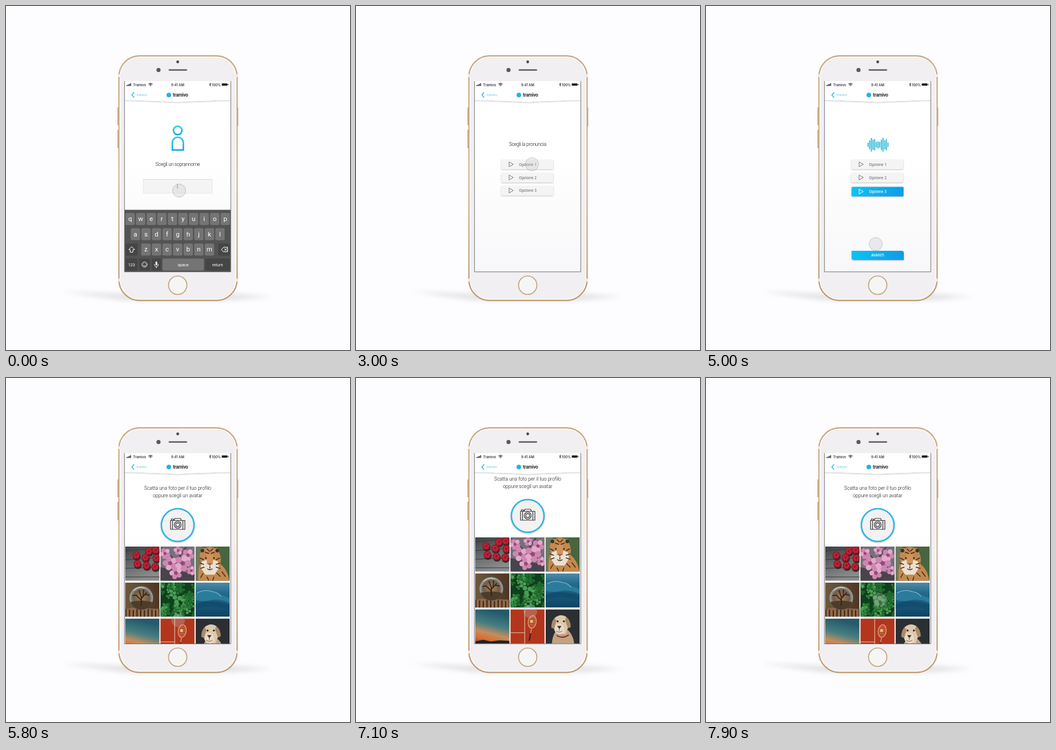
An HTML page for the animation above (8000 ms loop, 600 by 600 pixels).

```html
<!DOCTYPE html>
<html lang="it">
<head>
<meta charset="utf-8">
<title>Profile setup</title>
<style>
html, body { margin: 0; width: 100%; height: 100%; overflow: hidden; background: #fdfcfe; }
svg { display: block; width: 100vw; height: 100vh; }
text { text-anchor: middle; }
.title { font: 300 8.5px Roboto, sans-serif; letter-spacing: -.28px; fill: #111; }
.wide { letter-spacing: 0; }
.status { font: 500 5.9px Inter, sans-serif; fill: #222; }
.back { font: 300 5.7px Roboto, sans-serif; fill: #2bb9ea; }
.brand { font: 700 8.4px Roboto, sans-serif; letter-spacing: -.3px; fill: #333; }
.name { font: 9px "Open Sans", sans-serif; letter-spacing: .3px; fill: #777; }
.option { font: 600 6.4px "Open Sans", sans-serif; fill: #777; }
.next { font: 600 6.4px "Open Sans", sans-serif; fill: #fff; }
.key { font: 11.5px Roboto, sans-serif; fill: #fff; }
.small { font-size: 7.2px; }

/* every motion shares one 8 s cycle */
.anim, .part { animation: 8s linear infinite; }
.anim { animation-timing-function: ease-in-out; }
.part { opacity: 0; animation-name: flash; animation-timing-function: step-end; }
#pointer { animation-name: move; }
#pointer g { animation-name: blink; }
#nickname { animation-name: fade-a; }
#voice { animation-name: fade-b; }
#photo { animation-name: fade-c; }
#scroll { animation-name: scroll; }
#keyboard { animation-name: drop; }
#typed { animation-name: typed; }
#prompt { animation-name: prompt; }
.chosen { animation-name: chosen; }
.sel1 { animation-name: sel1; }
.sel2 { animation-name: sel2; }
.sel3 { animation-name: sel3; }
.bar { transform-box: fill-box; transform-origin: center; animation: bounce .5s ease-in-out infinite alternate; }
#typed, #prompt, .chosen, .sel { animation-timing-function: step-end; }

@keyframes move {
  0%, 11% { transform: translate(302px, 322px); }
  16.5%, 21% { transform: translate(305px, 426px); }
  35%, 39.5% { transform: translate(307px, 276px); }
  45%, 48.5% { transform: translate(307px, 299px); }
  53%, 57% { transform: translate(306px, 324px); animation-timing-function: ease-in; }
  62.5% { transform: translate(296px, 415px); animation-timing-function: ease-out; }
  65%, 69% { transform: translate(299px, 436px); animation-timing-function: ease-in-out; }
  77%, 82.5% { transform: translate(302px, 402px); }
  84% { transform: translate(303px, 423px); }
  88%, 91.25% { transform: translate(304px, 407px); }
  94% { transform: translate(304px, 423px); }
  97.5%, 100% { transform: translate(303px, 387px); }
}
@keyframes blink { 0%, 1.25%, 11%, 100% { opacity: 1; } 3.5%, 9% { opacity: 0; } }
@keyframes fade-a { 0%, 20% { opacity: 1; } 22%, 100% { opacity: 0; } }
@keyframes fade-b { 0%, 20%, 70.5%, 100% { opacity: 0; } 22%, 68.5% { opacity: 1; } }
@keyframes fade-c { 0%, 68.5% { opacity: 0; } 70.5%, 100% { opacity: 1; } }
@keyframes scroll { 0%, 84%, 94%, 100% { transform: none; } 88%, 91.25% { transform: translateY(-16px); } }
@keyframes drop { 0%, 8% { transform: none; } 11%, 100% { transform: translateY(110px); } }
@keyframes flash { 0% { opacity: 1; } 1.25%, 100% { opacity: 0; } }
@keyframes typed { 0% { opacity: 0; } 7.5%, 100% { opacity: 1; } }
@keyframes prompt { 0% { opacity: 1; } 38.75%, 100% { opacity: 0; } }
@keyframes chosen { 0% { opacity: 0; } 38.75%, 100% { opacity: 1; } }
@keyframes sel1 { 0%, 47.5%, 100% { opacity: 0; } 38.75% { opacity: 1; } }
@keyframes sel2 { 0%, 56.25%, 100% { opacity: 0; } 47.5% { opacity: 1; } }
@keyframes sel3 { 0% { opacity: 0; } 56.25%, 100% { opacity: 1; } }
@keyframes bounce { to { transform: scaleY(var(--s)); } }
</style>
</head>
<body>
<svg viewBox="0 0 600 600">
  <defs>
    <linearGradient id="blue"><stop stop-color="#0cc3f2"/><stop offset="1" stop-color="#0a9ce8"/></linearGradient>
    <linearGradient id="teal" x2="0" y2="1"><stop stop-color="#35cfe6"/><stop offset="1" stop-color="#1aa6e6"/></linearGradient>
    <linearGradient id="page" x2="0" y2="1"><stop offset=".4" stop-color="#fff"/><stop offset="1" stop-color="#f8f7f9"/></linearGradient>
    <linearGradient id="gold" x2="0" y2="1"><stop stop-color="#c9a87f"/><stop offset=".5" stop-color="#d3b797"/><stop offset="1" stop-color="#bd9a70"/></linearGradient>
    <linearGradient id="sea" x2="0" y2="1"><stop stop-color="#4f8ba6"/><stop offset=".3" stop-color="#246a8e"/><stop offset="1" stop-color="#0d4463"/></linearGradient>
    <linearGradient id="dusk" x1=".25" x2="0" y2="1"><stop stop-color="#245a6c"/><stop offset=".38" stop-color="#487f82"/><stop offset=".62" stop-color="#c58d5c"/><stop offset=".82" stop-color="#dc6a30"/><stop offset="1" stop-color="#8a3c22"/></linearGradient>
    <linearGradient id="wood" x2=".3" y2="1"><stop stop-color="#3d4244"/><stop offset=".55" stop-color="#666a6b"/><stop offset="1" stop-color="#8b8d8c"/></linearGradient>
    <linearGradient id="bark"><stop stop-color="#6d5a3b"/><stop offset="1" stop-color="#4d3524"/></linearGradient>
    <radialGradient id="glass"><stop stop-color="#a87f54"/><stop offset=".7" stop-color="#6f5c48"/><stop offset="1" stop-color="#9fabad"/></radialGradient>
    <filter id="soft" x="-20%" y="-40%" width="140%" height="200%"><feDropShadow dx="0" dy="1" stdDeviation="1" flood-opacity=".28"/></filter>
    <filter id="blur" x="-20%" y="-150%" width="140%" height="400%"><feGaussianBlur stdDeviation="4"/></filter>
    <clipPath id="screen"><path d="M207 131H392V463.500H207Z"/></clipPath>
    <clipPath id="tile"><path d="M0 0H59.500V59.500H0Z"/></clipPath>
    <g id="next" filter="url(#soft)">
      <path d="M254 421H341Q345 421 345 425V437H258Q254 437 254 433Z" fill="url(#blue)"/>
      <text class="next" x="299.500" y="431.200">AVANTI</text>
    </g>
  </defs>

  <!-- floor shadow -->
  <path d="M95 498L205 502H395L465 507L395 513H205Z" fill="#777" opacity=".2" filter="url(#blur)"/>

  <!-- phone body -->
  <path d="M194.500 177h3v31h-3zM194.500 216h3v32h-3zM402.500 177h2.500v32h-2.500z" fill="#c09b70"/>
  <rect x="197" y="87" width="206" height="426.500" rx="36" fill="#f1eff1" stroke="url(#gold)" stroke-width="2.400"/>
  <rect x="199" y="89" width="202" height="422.500" rx="34" fill="none" stroke="#fbfafb" stroke-width="1.500"/>
  <path d="M195 121.500h5M400 121.500h5M195 478h5M400 478h5" stroke="#f1edea" stroke-width="5"/>
  <circle cx="299.500" cy="97.500" r="2.400" fill="#4b4749"/>
  <circle cx="266" cy="111.700" r="3.600" fill="#5d5a5c"/>
  <rect x="283.500" y="110.300" width="32.500" height="2.600" rx="1.300" fill="#6b6566"/>
  <circle cx="299.500" cy="487" r="16" fill="#f6f5f6" stroke="#c4a27c" stroke-width="1.700"/>

  <g clip-path="url(#screen)">
    <path d="M207 131H392V464H207Z" fill="url(#page)"/>

    <g id="nickname" class="anim">
      <g fill="none" stroke="url(#teal)" stroke-width="2.700">
        <circle cx="299.500" cy="217" r="7.400"/>
        <path d="M290.100 251.200V238.500a9.600 9.600 0 0 1 19.200 0V251.200Z"/>
      </g>
      <text class="title" x="299.500" y="279">Scegli un soprannome</text>
      <path d="M239.500 302.500h120v24h-120z" fill="#f5f4f5" stroke="#e8e7e9"/>
      <path d="M239 302.500h121" stroke="#d9d8da"/>
      <path class="part" d="M299 310.500v8" stroke="#777" stroke-width=".9"/>
      <g id="letters"></g>
      <use href="#next"/>
      <g id="keyboard" class="anim"><path d="M206 355.500H393V464H206Z" fill="#535354"/></g>
    </g>

    <g id="voice" class="anim">
      <text id="prompt" class="title anim" x="299.300" y="243.500">Scegli la pronuncia</text>
      <g id="wave" class="anim chosen"></g>
      <g id="options"></g>
      <g class="anim chosen"><use href="#next" y="6"/></g>
    </g>

    <g id="photo" class="anim">
      <g id="scroll" class="anim">
        <text class="title wide" x="299.500" y="194.500">Scatta una foto per il tuo profilo</text>
        <text class="title wide" x="299.500" y="208.300">oppure scegli un avatar</text>
        <circle cx="299.500" cy="256.500" r="28.500" fill="#f3f2f3" stroke="#2bb4e6" stroke-width="2.600" filter="url(#soft)"/>
        <g fill="none" stroke="#333" stroke-width="1.200">
          <path d="M287 248.500h25v15.500h-25zM293 248.500l1.500-3.500h10l1.500 3.500M288.500 248v-2h3.500v2M290.500 249v15M308.500 249v15"/>
          <circle cx="299.500" cy="256" r="6" fill="#f3f2f3"/>
          <circle cx="299.500" cy="256" r="3.400"/>
        </g>
        <g id="tiles"></g>
      </g>
    </g>

    <!-- header -->
    <path d="M206 131H393V164Q349 165 299.500 167.500Q250 165 206 164Z" fill="#fff" filter="url(#soft)"/>
    <path d="M210 138h1.500v1.500H210zM212.200 137h1.500v2.500h-1.500zM214.400 136h1.500v3.500h-1.500zM216.600 134.800h1.500v4.700h-1.500z" fill="#222"/>
    <text class="status" x="233" y="139.500">Tramivo</text>
    <path d="M248.500 136.400q3.500-3 7 0M250.200 138q1.800-1.600 3.600 0" fill="none" stroke="#222" stroke-width="1.200"/>
    <circle cx="252" cy="139" r=".7" fill="#222"/>
    <text class="status" x="299.500" y="139.500">9:41 AM</text>
    <path d="M354.600 135.500l3 3-1.500 1.300v-5.600l1.500 1.300-3 3" fill="none" stroke="#222" stroke-width=".7"/>
    <text class="status" x="367" y="139.500">100%</text>
    <rect x="376.300" y="135" width="10" height="4" rx=".8" fill="#222"/>
    <path d="M387 136h1v2h-1z" fill="#222"/>
    <path d="M223.500 150.500l-4 4.700 4 4.700" fill="none" stroke="#22b5e8" stroke-width="1.400"/>
    <text class="back" x="237" y="157.300">Indietro</text>
    <circle cx="284" cy="155.300" r="4" fill="#1fb5e6"/>
    <text class="brand" x="304.300" y="158.300">tramivo</text>
  </g>
  <path d="M206.700 131V463.700H392V131" fill="none" stroke="#646265" stroke-width=".9"/>

  <g id="pointer" class="anim"><g class="anim">
    <circle r="11.500" fill="#c4c4c6" fill-opacity=".3" stroke="#8a8a8c" stroke-opacity=".5" stroke-width=".8"/>
  </g></g>
</svg>
<script>
const add = (id, html) => document.getElementById(id).insertAdjacentHTML("beforeend", html);
const each = (n, fn) => Array.from({ length: n }, (_, i) => fn(i)).join("");
const dot = (x, y, r, fill) => `<circle cx="${x}" cy="${y}" r="${r}" fill="${fill}"/>`;
const path = (d, fill, extra = "") => `<path d="${d}" fill="${fill}" ${extra}/>`;
const line = (d, color, width) => path(d, "none", `stroke="${color}" stroke-width="${width}" stroke-linecap="round"`);

// nickname typed letter by letter, centred
const nick = "Serena";
add("letters", each(nick.length - 1, i =>
  `<text class="name part" style="animation-delay:${(i + 1) / 10}s" x="299.500" y="317.300">${nick.slice(0, i + 1)}</text>`) +
  `<text id="typed" class="name anim" x="299.500" y="317.300">${nick}</text>`);

// keyboard
const key = (x, y, w, label, fill = "#747475", cls = "") =>
  `<rect x="${x}" y="${y}" width="${w}" height="21" rx="2.500" fill="${fill}"/>` +
  `<text class="key ${cls}" x="${x + w / 2}" y="${y + (cls ? 13 : 14.2)}">${label}</text>`;
const dark = "#454546";
["qwertyuiop", "asdfghjkl", "zxcvbnm"].forEach((row, r) =>
  add("keyboard", each(row.length, i => key([208.3, 217.5, 235.9][r] + i * 18.45, 361 + r * 26.6, 16.3, row[i]))));
add("keyboard",
  key(208.5, 414.2, 21, "", dark) + key(370, 414.2, 20.5, "", dark) +
  key(208.5, 440.5, 21, "123", dark, "small") + key(232, 440.5, 19.5, "", dark) +
  key(254, 440.5, 16.5, "", dark) + key(273, 440.5, 72, "space", "#747475", "small") +
  key(347.5, 440.5, 43, "return", dark, "small") +
  line("M219 420l-5 5h2.700v4.500h4.600V425h2.700zM376 424.700l3.500-4h7v8h-7zM381 422.700l4 4m0-4l-4 4", "#fff", 1) +
  line("M246.200 451a4.500 4.500 0 1 1-9 0a4.500 4.500 0 1 1 9 0M239 452q2.700 3.500 5.400 0M240 449.300v.2M243.500 449.300v.2", "#fff", .9) +
  line("M259 450.500q0 4 3.300 4t3.300-4M262.300 454.500v2.500", "#fff", 1) +
  line("M262.300 447v3.800", "#fff", 3));

// sound wave
const bars = [8, 16, 24, 18, 20, 10, 13, 10, 18, 24, 16, 20, 8];
add("wave", bars.map((h, i) =>
  `<rect class="bar" style="--s:${i % 2 ? .5 : h > 18 ? .6 : 1.4}" x="${281.7 + i * 2.9}" y="${242 - h / 2}" width="1.900" height="${h}" rx=".9" fill="#2fb9d8"/>`).join(""));

// pronunciation options
const option = (n, y, on) =>
  `<g ${on ? `class="anim sel sel${n}"` : ""}>
    <rect x="${on ? 254 : 253.5}" y="${y}" width="90.500" height="16.500" rx="1.500" fill="${on ? "url(#blue)" : "#f5f4f5"}" filter="url(#soft)"/>
    ${line(`M267 ${y + 4.2}v8.200l7-4.100z`, on ? "#fff" : "#777", 1)}
    <text class="option" x="299.500" y="${y + 10.6}" ${on ? 'style="fill:#fff"' : ""}>Opzione ${n}</text>
  </g>`;
[268, 291, 313.7].forEach((y, i) => add("options", option(i + 1, y) + option(i + 1, y + 1.8, true)));

// avatar pictures, each on a 59.5 square
const full = fill => path("M0 0H60V60H0Z", fill);
const flower = (x, y, r) => each(5, i => {
  const a = i * 1.257 + x;
  return dot(x + r * Math.cos(a), y + r * Math.sin(a), r * .62, i % 2 ? "#e3a8cb" : "#cf86b2");
}) + dot(x, y, r * .4, "#a04474");
const berry = (x, y) => dot(x + 1, y + 2.5, 6.8, "#2b2a2c") + dot(x, y, 6.6, "#9c1527") +
  each(6, i => dot(x + 3.6 * Math.cos(i), y + 3.6 * Math.sin(i), 1.7, "#bd2738"));
const clover = (x, y, r, fill) => each(3, i =>
  dot(x + r * Math.cos(i * 2.09 + x), y + r * Math.sin(i * 2.09 + x), r * .8, fill));
const greens = ["#1d6a2d", "#34883f", "#236f31", "#4f9f56"];

const pictures = [
  full("url(#wood)") + each(4, i => line(`M0 ${8 + i * 15}L60 ${2 + i * 17}`, "#333839", 1.2)) +
    [[41, 8], [53, 6], [19, 15], [54, 20], [35, 19], [21, 30], [37, 33], [52, 35]].map(p => berry(...p)).join(""),
  full("#75707a") + path("M0 36L60 48V60H0Z", "#4a434c") + line("M3 3L27 25L59 43M28 25L44 2", "#4d2e3b", 2) +
    [[8, 12, 6], [31, 7, 5], [48, 15, 7], [17, 29, 8], [39, 29, 9], [27, 46, 7], [54, 42, 5]].map(p => flower(...p)).join(""),
  full("#47663f") + path("M0 0H12V60H0Z", "#6c7a61") + path("M5 60Q4 40 9 26Q5 14 10 9Q9 1 16 3Q25 -2 34 3Q42 1 41 10Q46 20 43 30Q56 40 59 60Z", "#c4894f") +
    dot(12, 7, 3.2, "#403126") + dot(38, 7, 3.2, "#403126") + path("M11 26Q25 19 39 26L41 37L33 49H17L9 37Z", "#ebe0d0") +
    path("M19 15L25 11L31 15L30 31H20Z", "#d0935b") + path("M21 29h8l-4 5z", "#a0604f") + dot(18, 20, 1.5, "#2c241d") + dot(32, 20, 1.5, "#2c241d") +
    line("M20 4l4 4M30 4l-4 4M17 10l6 2M33 10l-6 2M8 20l6 3M42 20l-6 3M8 29l6 2M42 29l-6 2M9 38l6-2M43 38l-7-2M25 35v3M21 39q4 3 8 0M13 47l-4 7M37 46l6 6M46 44l6 8M20 53l3 6M32 53l-2 6", "#3a2d23", 1.5),
  full("url(#bark)") + path("M0 47L11 44L60 46V60H0Z", "#92694a") +
    each(10, i => line(`M${i * 6.5 + 1} ${47 + i % 3}v12`, "#33251b", 2)) + dot(28, 27, 20.5, "url(#glass)") +
    path("M9 34Q28 29 47 34Q43 47 28 47.500Q14 47 9 34Z", "#4e3c2b") +
    line("M28 40V24M28 31l-9-9M28 28l9-10M28 25l-4-11M19 22l-6 1M35 21l7 1M31 25l1-12", "#33241c", 1.8) +
    line("M15 14Q23 6 34 10", "#c9d5d8", 1.2),
  full("#103f1d") + each(60, i => clover((i * 23.7 + 5) % 61, (i * 37.3 + i * i * 1.7) % 61, 2.4 + i % 3 * .6, greens[i % 4])) +
    clover(29, 29, 5, "#4a9d54"),
  full("url(#sea)") + path("M0 20Q18 9 32 16T60 27V36Q42 27 25 31Q10 34 0 30Z", "#2b7c9c") +
    path("M0 38Q24 27 60 39V48Q29 37 0 46Z", "#124d6f") + line("M3 18Q17 11 29 16Q39 17 44 24", "#7fb2c4", 1.3),
  full("url(#dusk)") + path("M0 56L14 53L27 56L42 54L60 55V60H0Z", "#1d2526"),
  full("#b3361c") + line("M25 0V60M0 41H25", "#dcae98", 1.3) +
    `<ellipse cx="38" cy="22" rx="7" ry="11" fill="#b9452a" stroke="#dba080" stroke-width="1.400" transform="rotate(8 38 22)"/>` +
    each(4, i => line(`M33 ${15 + i * 4}h10M${34 + i * 2.7} 14v17`, "#cf8a6c", .4)) +
    line("M37 33l-2 10", "#d59a70", 1.5) + line("M35 43l-2 11", "#3a2724", 2.6) + dot(37, 21, 2.6, "#d9c95c"),
  full("#2b2f34") + path("M11 60Q12 46 18 38L39 36Q49 46 50 60Z", "#bfa384") + path("M16 15Q26 7 36 13L41 27L35 43H19L12 29Z", "#dcc8ab") +
    path("M16 15Q10 20 10 32L15 34L19 20ZM36 13Q44 19 44 31L39 33L34 19Z", "#a98b69") + path("M17 28Q25 22 31 28L33 40L25 44L16 38Z", "#e9dac6") +
    dot(21, 21, 1.6, "#2b221e") + dot(32, 21, 1.6, "#2b221e") + path("M20 29h8l-4 5z", "#3b2d2a") +
    line("M24 34v3M19 38q5 4 10 0", "#765746", 1) + line("M20 46q9 6 20-1", "#8e2f2a", 2.2)
];
add("tiles", pictures.map((art, i) =>
  `<g transform="translate(${208 + i % 3 * 61.3} ${294 + Math.floor(i / 3) * 62.7})" clip-path="url(#tile)">${art}</g>`).join(""));
</script>
</body>
</html>
```
